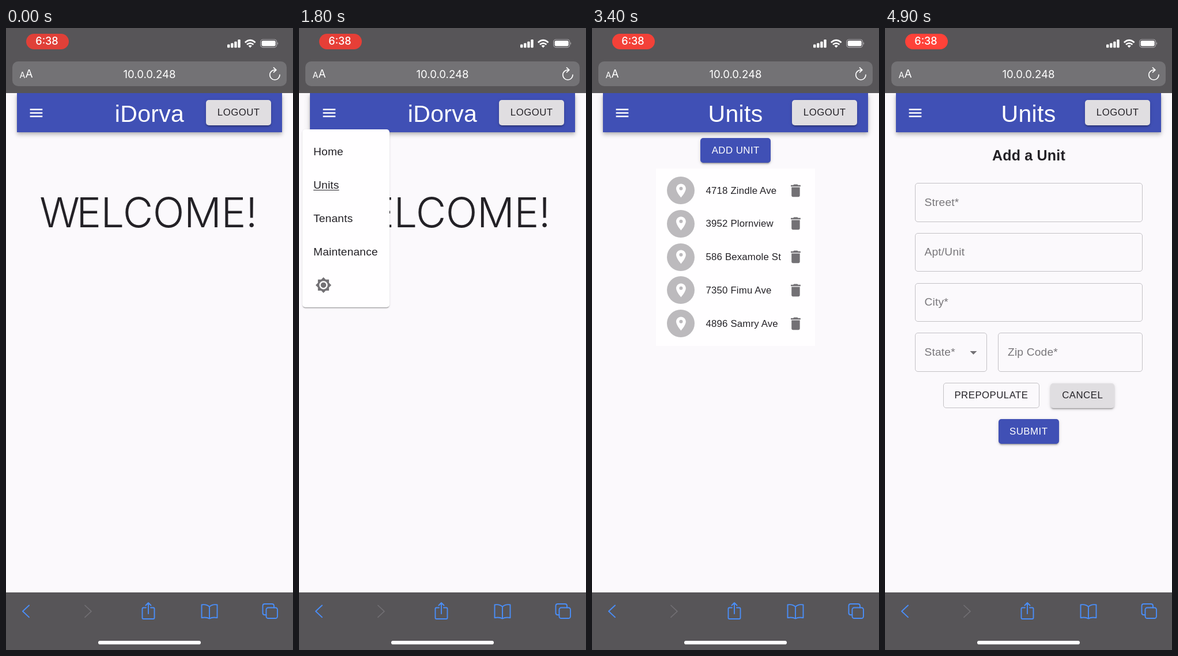
Animation of 498x1080 px, one loop 5000 ms. Source, as an HTML page:

```html
<!DOCTYPE html>
<html lang="en">
<head>
<meta charset="utf-8">
<title>Rental manager</title>
<style>
html, body { margin: 0; width: 100%; height: 100%; overflow: hidden; }
body { position: relative; background: #fbf9fc; color: #232126; font: 19.2px "Liberation Sans", Arial, sans-serif; letter-spacing: .18px; }
.box, .text, .layer, svg { position: absolute; }
.layer { inset: 0; }
.box { left: calc(var(--x) * 1px); top: calc(var(--y) * 1px); width: calc(var(--w) * 1px); height: calc(var(--h) * 1px); box-sizing: border-box; }
.text { left: calc(var(--x) * 1px); top: calc(var(--y) * 1px - 40px); line-height: 80px; white-space: nowrap; }
.mid { transform: translateX(-50%); }
.icon { width: 28.9px; height: 28.9px; left: calc(var(--x) * 1px - 14.45px); top: calc(var(--y) * 1px - 14.45px); fill: #737175; }
.ui { font-family: Inter, sans-serif; letter-spacing: 0; color: #fff; }

.bar { background: #4050b5; box-shadow: 0 2.4px 4.8px -1.2px #0003, 0 4.8px 6px #00000024, 0 1.2px 12px #0000001f; }
.title { font-size: 41px; letter-spacing: .3px; color: #fff; }
.hero { font: 300 72px/80px Inter, sans-serif; letter-spacing: -.4px; }
.hero span { letter-spacing: -5.6px; }
.btn { border-radius: 5px; background: #e0dee1; display: flex; align-items: center; justify-content: center; font-size: 16.8px; letter-spacing: .48px; text-indent: .48px;
  box-shadow: 0 3.6px 1.2px -2.4px #0003, 0 2.4px 2.4px #00000024, 0 1.2px 6px #0000001f; }
.blue { background: #4050b5; color: #fff; }
.outline { background: none; border: 1.2px solid #c3c1c5; box-shadow: none; }
.field { border: 1.2px solid #c3c1c5; border-radius: 5px; padding-left: 16px; display: flex; align-items: center; color: #78767a; }
.avatar { border-radius: 50%; background: #bcbabd; }
.address { font-size: 16.8px; }

.menu { background: #fffeff; border-radius: 5px; transform-origin: 50% 3px;
  box-shadow: 0 2.4px 1.2px -1.2px #0003, 0 1.2px 1.2px #00000024, 0 1.2px 3.6px #0000001f;
  animation: fade 5s cubic-bezier(.4,0,.2,1) infinite, grow 5s cubic-bezier(.4,0,.2,1) infinite; }
.link { text-decoration: underline; text-decoration-thickness: 1.2px; text-underline-offset: 2px; animation: hover 5s step-end infinite; }
.home { animation: home 5s step-end infinite; }
.units { animation: units 5s step-end infinite; }
.list { animation: list 5s step-end infinite; }
.form { animation: form 5s step-end infinite; }
.pill { border-radius: 14px; animation: pulse 5s ease-in-out infinite; }

@keyframes home { 0% { visibility: visible } 37.9%, 100% { visibility: hidden } }
@keyframes units { 0% { visibility: hidden } 37.9%, 100% { visibility: visible } }
@keyframes list { 0% { visibility: hidden } 37.9% { visibility: visible } 85.9%, 100% { visibility: hidden } }
@keyframes form { 0% { visibility: hidden } 85.9%, 100% { visibility: visible } }
@keyframes hover { 0% { text-decoration-color: transparent } 29.9%, 100% { text-decoration-color: currentColor } }
@keyframes fade { 0%, 16% { opacity: 0 } 22%, 36.4% { opacity: 1 } 42.4%, 100% { opacity: 0 } }
@keyframes grow { 0%, 16% { transform: scale(.75, .5625) } 20%, 38.4% { transform: none } 42%, 100% { transform: scale(.75, .5625) } }
@keyframes pulse {
  0% { background: #e04038 } 5.5%, 42%, 79% { background: #de3e37 }
  24%, 60%, 97.5% { background: #ff4239 } 100% { background: #fd4239 }
}
</style>
</head>
<body>
<svg width="0" height="0">
  <symbol id="lines" viewBox="0 0 24 24"><path d="M3 18h18v-2H3v2zm0-5h18v-2H3v2zm0-7v2h18V6H3z"/></symbol>
  <symbol id="bin" viewBox="0 0 24 24"><path d="M6 19c0 1.1.9 2 2 2h8c1.1 0 2-.9 2-2V7H6v12zM19 4h-3.5l-1-1h-5l-1 1H5v2h14V4z"/></symbol>
  <symbol id="pin" viewBox="0 0 24 24"><path d="M12 2C8.13 2 5 5.13 5 9c0 5.25 7 13 7 13s7-7.75 7-13c0-3.87-3.13-7-7-7zm0 9.5a2.5 2.5 0 1 1 0-5 2.5 2.5 0 0 1 0 5z"/></symbol>
  <symbol id="sun" viewBox="0 0 24 24"><path fill-rule="evenodd" d="M20 8.69V4h-4.69L12 .69 8.69 4H4v4.69L.69 12 4 15.31V20h4.69L12 23.31 15.31 20H20v-4.69L23.31 12zM12 18a6 6 0 1 1 0-12 6 6 0 0 1 0 12zm0-10a4 4 0 1 0 0 8 4 4 0 0 0 0-8z"/></symbol>
  <symbol id="arrow" viewBox="0 0 24 24"><path d="M7 10l5 5 5-5z"/></symbol>
</svg>

<div class="box bar" style="--x:19;--y:113;--w:460;--h:68"></div>
<svg class="icon" style="--x:52.4;--y:147;fill:#fff"><use href="#lines"/></svg>
<div class="text mid title home" style="--x:249;--y:149">iDorva</div>
<div class="text mid title units" style="--x:249;--y:149">Units</div>
<div class="box btn" style="--x:347;--y:125;--w:113;--h:44">LOGOUT</div>

<div class="layer home">
  <div class="text mid hero" style="--x:247;--y:320"><span>W</span>ELCOME!</div>
</div>

<div class="layer list">
  <div class="box btn blue" style="--x:188;--y:191;--w:122;--h:43">ADD UNIT</div>
  <div class="box" style="--x:111;--y:244;--w:276;--h:308;background:#fffeff"></div>
  <div id="rows"></div>
</div>

<div class="layer form">
  <div class="text mid" style="--x:249.5;--y:221;font-size:25px;font-weight:bold;letter-spacing:.2px">Add a Unit</div>
  <div class="box field" style="--x:51.5;--y:269;--w:395.5;--h:67.5">Street*</div>
  <div class="box field" style="--x:51.5;--y:355.7;--w:395.5;--h:67.5">Apt/Unit</div>
  <div class="box field" style="--x:51.5;--y:442.5;--w:395.5;--h:67.5">City*</div>
  <div class="box field" style="--x:51.5;--y:529.3;--w:125.5;--h:67.5">State*</div>
  <svg class="icon" style="--x:153.7;--y:563"><use href="#arrow"/></svg>
  <div class="box field" style="--x:196;--y:529.3;--w:251;--h:67.5">Zip Code*</div>
  <div class="box btn outline" style="--x:100.5;--y:616;--w:167.5;--h:43.5">PREPOPULATE</div>
  <div class="box btn" style="--x:287;--y:616.5;--w:111;--h:43.5">CANCEL</div>
  <div class="box btn blue" style="--x:196.5;--y:679;--w:105;--h:43">SUBMIT</div>
</div>

<div class="box menu" style="--x:6;--y:176;--w:151;--h:309">
  <div class="text" style="--x:19;--y:39">Home</div>
  <div class="text link" style="--x:19;--y:97">Units</div>
  <div class="text" style="--x:19;--y:155">Tenants</div>
  <div class="text" style="--x:19;--y:213">Maintenance</div>
  <svg class="icon" style="--x:36.8;--y:270"><use href="#sun"/></svg>
</div>

<svg width="498" height="1080" style="left:0;top:0" fill="none" stroke-linecap="round" stroke-linejoin="round">
  <path fill="#575558" d="M0 0h498v113H0zM0 980h498v100H0z"/>
  <rect x="11" y="58" width="476" height="43" rx="10" fill="#737275"/>
  <g fill="#fff">
    <rect x="384" y="28.5" width="4.4" height="5.7" rx="1.2"/>
    <rect x="390.1" y="26.3" width="4.4" height="7.9" rx="1.2"/>
    <rect x="396.2" y="23.5" width="4.4" height="10.7" rx="1.2"/>
    <rect x="402.3" y="20" width="4.4" height="14.2" rx="1.2"/>
    <rect x="443.7" y="22" width="24" height="9.6" rx="2.3"/>
    <path d="M471 24.5q2 2.3 0 4.6z" opacity=".6"/>
    <path d="M423.7 34.2l-3.1-3.2q3.1-2.6 6.2 0z"/>
    <rect x="160" y="1064" width="178" height="6.3" rx="3.1"/>
  </g>
  <rect x="441.8" y="20" width="27.8" height="13.6" rx="4" stroke="#aaa8ac" stroke-width="1.2"/>
  <g stroke="#fff" stroke-width="2.6" stroke-linecap="butt">
    <path d="M414.8 25.2q8.9-8 17.8 0M418 28.8q5.7-5 11.4 0"/>
  </g>
  <path d="M466.4 72.8a8.6 8.6 0 1 0 8.6 8.6M464.5 68.8l4.4 4-4.4 4" stroke="#fff" stroke-width="1.7"/>
  <g stroke="#4a8ef8" stroke-width="1.9">
    <path d="M40 1002.5l-11 10.3 11 10.3"/>
    <path d="M243 1006.5h-4.5q-2 0-2 2v15.5q0 2 2 2h17q2 0 2-2v-15.5q0-2-2-2H251M247 1017v-18.5M242.5 1002.5l4.5-4.5 4.5 4.5"/>
    <path d="M353 1005q-5-5-13.5-3.500v22.500q8.500-1.500 13.500 1.500 5-3 13.500-1.500v-22.500q-8.500-1.500-13.500 3.500zv20"/>
    <rect x="451.5" y="1006.5" width="19.5" height="18.5" rx="3.5"/>
    <path d="M451.5 1019h-2.500q-3.500 0-3.500-3.500v-12q0-3.500 3.500-3.500h12.500q3.500 0 3.500 3.500v3"/>
  </g>
  <path d="M137 1002.5l11 10.3-11 10.3" stroke="#716f73" stroke-width="1.7"/>
</svg>
<div class="box pill" style="--x:35;--y:10;--w:73.5;--h:26.5"></div>
<div class="text ui mid" style="--x:71;--y:23;font-size:18px;font-weight:500">6:38</div>
<div class="text ui" style="--x:23.5;--y:81.5;font-size:14.5px">A</div>
<div class="text ui" style="--x:33.5;--y:80;font-size:19px">A</div>
<div class="text ui mid" style="--x:249;--y:80;font-size:18.6px">10.0.0.248</div>

<script>
const addresses = ["4718 Zindle Ave", "3952 Plornview", "586 Bexamole St", "7350 Fimu Ave", "4896 Samry Ave"];
const row = (address, i) => {
  const y = 282 + i * 57.8;
  return `<div class="box avatar" style="--x:130;--y:${y - 24};--w:48;--h:48"></div>
    <svg class="icon" style="--x:154;--y:${y};fill:#fffeff"><use href="#pin"/></svg>
    <div class="text address" style="--x:197.5;--y:${y + .5}">${address}</div>
    <svg class="icon" style="--x:353.5;--y:${y}"><use href="#bin"/></svg>`;
};
document.getElementById("rows").innerHTML = addresses.map(row).join("");
</script>
</body>
</html>
```
